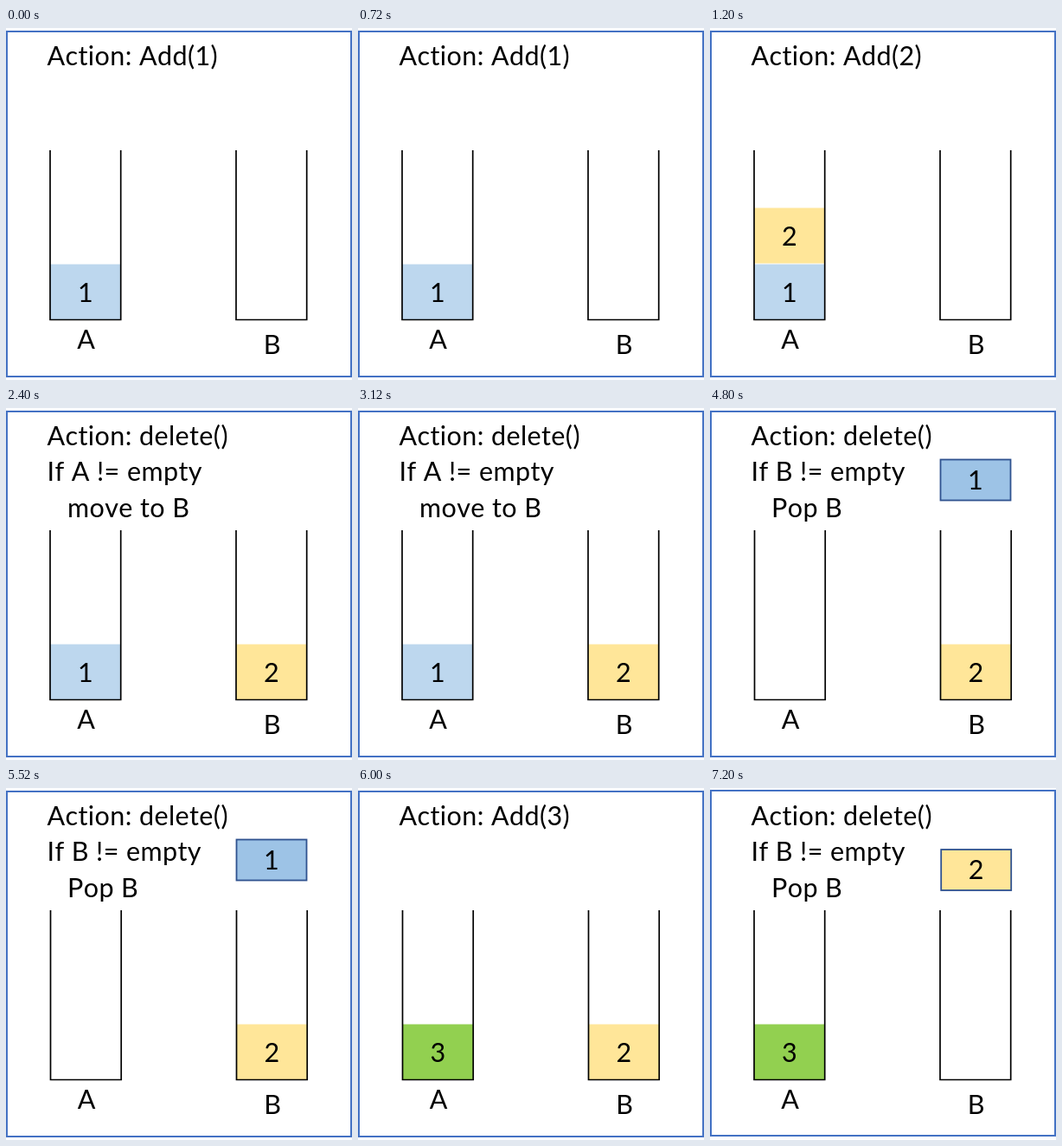
These frames come from a looping animation (400x406 px, 8 s). An HTML page:

```html
<!DOCTYPE html>
<html lang="en">
<head>
<meta charset="utf-8">
<title>Two stacks</title>
<style>
  html, body { margin: 0; width: 100%; height: 100%; overflow: hidden; background: #fff; }
  svg { display: block; width: 100vw; height: 100vh; }
  text { font: 30.5px Lato, sans-serif; font-kerning: none; fill: #000; letter-spacing: .4px; }
  .mid { text-anchor: middle; letter-spacing: 0; }
</style>
</head>
<body>
<svg id="stage" viewBox="0 0 400 406" xmlns="http://www.w3.org/2000/svg"></svg>
<script>
const LOOP = 8000, STEP = 1200;
const LIGHT = { 1: '#bdd7ee', 2: '#ffe699', 3: '#92d050' };
const POPPED = { 1: '#9dc3e6', 2: '#ffe699' };
const COLUMNS = { A: { x: 51, labelY: 369.5 }, B: { x: 266, labelY: 375.5 } };
const BASE = 336.5, WIDTH = 81.7, BLOCK = 64, PITCH = 65;

const move = ['Action: delete()', 'If A != empty', 'move to B'];
const pop = ['Action: delete()', 'If B != empty', 'Pop B'];
const steps = [
  { lines: ['Action: Add(1)'], A: [1], B: [] },
  { lines: ['Action: Add(2)'], A: [1, 2], B: [] },
  { lines: move, A: [1], B: [2] },
  { lines: move, A: [], B: [2, 1] },
  { lines: pop, A: [], B: [2], out: { n: 1, x: 266.5, y: 59.5 }, shift: .5 },
  { lines: ['Action: Add(3)'], A: [3], B: [2], shift: .5 },
  { lines: pop, A: [3], B: [], out: { n: 2, x: 267.2, y: 71 }, top: 3 }
];

const stage = document.getElementById('stage');

const text = (s, x, y, cls = '') => `<text class="${cls}" x="${x}" y="${y}">${s}</text>`;
const rect = (x, y, w, h, attrs) => `<rect x="${x}" y="${y}" width="${w}" height="${h}" ${attrs}/>`;

function column(name, items) {
  const { x, labelY } = COLUMNS[name], cx = x + WIDTH / 2;
  const blocks = items.map((n, i) => {
    const y = BASE - BLOCK - i * PITCH;
    return rect(x, y, WIDTH, BLOCK, `fill="${LIGHT[n]}"`) + text(n, cx, y + 43, 'mid');
  });
  return blocks.join('') +
    `<path d="M${x} 141V${BASE}h${WIDTH}V141" fill="none" stroke="#000" stroke-width="1.7"/>` +
    text(name, cx + .8, labelY, 'mid');
}

function popped({ n, x, y }) {
  return rect(x, y, 81, 47, `fill="${POPPED[n]}" stroke="#2f528f" stroke-width="1.8"`) +
    text(n, x + 40.3, y + 34.3, 'mid');
}

function draw({ lines, A, B, out, shift = 0, top = 4 }) {
  const words = lines.map((s, i) => text(s, i < 2 ? 47.5 : 71, 42.7 + i * 41.5)).join('');
  stage.innerHTML =
    rect(1, top, 398, 398, 'fill="#fff" stroke="#4472c4" stroke-width="2"') + words +
    `<g transform="translate(${shift} 0)">${column('A', A)}${column('B', B)}</g>` +
    (out ? popped(out) : '');
}

let shown = -1;
function tick(now) {
  const i = Math.floor((now % LOOP) / STEP);
  if (i !== shown) draw(steps[shown = i]);
  requestAnimationFrame(tick);
}
tick(performance.now());
</script>
</body>
</html>
```
